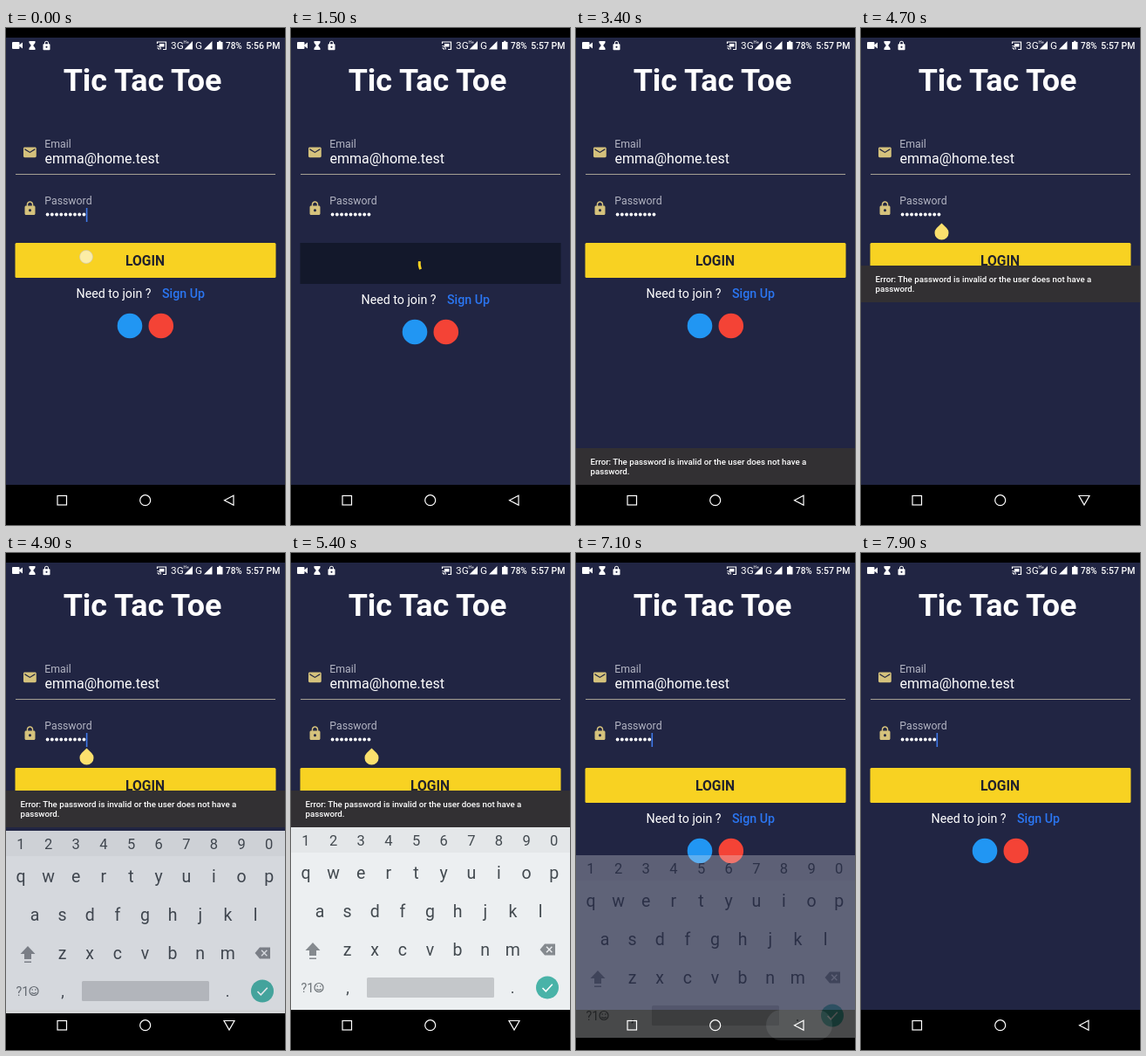
Recreate the animation shown at these times as an HTML page. Size 320 by 569 pixels, loop 8 s.

```html
<!DOCTYPE html>
<html lang="en">
<head>
<meta charset="utf-8">
<title>Login</title>
<style>
  html, body { margin: 0; width: 100%; height: 100%; overflow: hidden; background: #000; }
  svg { display: block; width: 100vw; height: 100vh; font-family: Roboto, "Noto Sans", sans-serif; }
  text { fill: #fff; white-space: pre; }
  .mid { text-anchor: middle; }
  .med { font-weight: 500; }
  .label { font-size: 12.3px; fill: #b3b5c3; }
  .gold { fill: #d5c27c; }
  .line { fill: none; stroke: #fff; stroke-width: 1.2; }
  .status { font-size: 10.5px; }
  .network { font-size: 11.8px; }
  #keyboard text { fill: #434a50; text-anchor: middle; }
</style>
</head>
<body>
<svg viewBox="0 0 320 569" preserveAspectRatio="none">
  <defs>
    <path id="lock" d="M18 8h-1V6c0-2.76-2.24-5-5-5S7 3.24 7 6v2H6c-1.1 0-2 .9-2 2v10c0 1.1.9 2 2 2h12c1.1 0 2-.9 2-2V10c0-1.1-.9-2-2-2zm-6 9c-1.1 0-2-.9-2-2s.9-2 2-2 2 .9 2 2-.9 2-2 2zm3.1-9H8.9V6c0-1.71 1.39-3.1 3.1-3.1s3.1 1.39 3.1 3.1z"/>
    <clipPath id="snackClip"><rect y="481" width="320" height="42"/></clipPath>
  </defs>
  <rect width="320" height="569"/>
  <rect y="11" width="320" height="512" fill="#212543"/>

  <!-- status bar -->
  <g fill="#fff">
    <rect x="7" y="16" width="8.5" height="8" rx="1"/>
    <path d="M15 19.5l4-3v7l-4-3z"/>
    <path d="M26.5 15h7v2l-2.3 3 2.3 3v2h-7v-2l2.3-3-2.3-3z"/>
    <use href="#lock" transform="translate(40.5 14.2) scale(.5)"/>
    <path class="line" d="M173.500 18v-2h10v8.500h-3.500M173.500 20.500a4 4 0 0 1 4 4M173.500 22.800a2 2 0 0 1 2 2"/>
    <rect x="176" y="18" width="5.500" height="3.500"/>
    <path d="M214 15v9.500h-9.500zM236.500 15v9.500h-9.500z"/>
    <path d="M242 16h2v-1.300h2.500v1.300h2v8.500h-6.500z"/>
    <text class="network" x="189" y="24.300">3G</text>
    <text x="203.500" y="17.500" style="font-size:5px">H+</text>
    <text class="network" x="217" y="24.300">G</text>
    <text class="status med" x="252" y="24" style="font-size:10px">78%</text>
    <text class="status med mid" id="clock" x="294.800" y="24"></text>
  </g>

  <!-- form -->
  <text class="mid" x="156.500" y="72" font-size="35.900" font-weight="700">Tic Tac Toe</text>
  <path class="gold" transform="translate(18.500 133.500) scale(.74)" d="M20 4H4c-1.1 0-2 .9-2 2v12c0 1.1.9 2 2 2h16c1.1 0 2-.9 2-2V6c0-1.100-.9-2-2-2zm0 4l-8 5-8-5V6l8 5 8-5z"/>
  <text class="label" x="44.300" y="136.500">Email</text>
  <text x="44.500" y="154.500" font-size="16">emma@home.test</text>
  <rect x="11" y="167" width="298" height="1" fill="#a5a093"/>
  <use class="gold" href="#lock" transform="translate(18.500 197.500) scale(.75)"/>
  <text class="label" x="44.300" y="201.500">Password</text>
  <g id="dots" fill="#fff"></g>
  <rect id="cursor" y="206" width="1.600" height="16" fill="#3f78e8"/>
  <path id="handle" d="M92.500 223.500L98.200 229A8 8 0 1 1 86.800 229z" fill="#fbe06d"/>
  <g id="login">
    <rect x="10.500" y="246" width="299" height="40" rx="1.500" fill="#f8d222"/>
    <text class="mid" x="159.500" y="271.500" font-size="15.700" font-weight="700" style="fill:#22222c">LOGIN</text>
  </g>
  <g id="loading">
    <rect x="10.500" y="246" width="299" height="47" fill="#13182b"/>
    <path id="arc" fill="none" stroke="#f8d222" stroke-width="3" stroke-linecap="square"/>
  </g>
  <g id="links">
    <text x="80.500" y="308.500" font-size="14.220">Need to join ?</text>
    <text class="med" x="179" y="308.500" font-size="14.220" style="fill:#2b76f2">Sign Up</text>
    <circle cx="142" cy="341" r="14.300" fill="#2196f3"/>
    <circle cx="177.800" cy="341" r="14.300" fill="#f44336"/>
  </g>

  <rect id="cover" y="314" width="320" height="209" fill="#212543"/>
  <g id="snack"><g clip-path="url(#snackClip)"><g id="snackBody">
    <rect y="481" width="320" height="42" fill="#323033"/>
    <g id="snackText" class="med" font-size="9.720">
      <text x="16.500" y="499.500">Error: The password is invalid or the user does not have a</text>
      <text x="16.500" y="510.500">password.</text>
    </g>
  </g></g></g>

  <g id="keyboard">
    <rect y="314" width="320" height="209" fill="#eceff1"/>
    <rect y="314" width="320" height="29" fill="#e4e7e9"/>
    <g id="keys"></g>
    <path d="M25 446l8.500 9h-4.500v6h-8v-6h-4.500zM21 463.500h8v1.500h-8z" fill="#858a8f"/>
    <path d="M291 447.500h12v13h-12l-5.500-6.500z" fill="#858a8f"/>
    <path d="M293 450.800l6.400 6.400m0-6.400l-6.400 6.400" stroke="#eceef1" stroke-width="1.400"/>
    <text x="18.800" y="502.500" font-size="14.300" style="fill:#6c7277">?1</text>
    <g fill="none" stroke="#6c7277" stroke-width="1.200">
      <circle cx="32" cy="497.500" r="5"/>
      <path d="M29.300 499a3 2.600 0 0 0 5.400 0M30.200 495.300v1.500M33.800 495.300v1.500"/>
    </g>
    <rect x="87" y="486" width="146" height="23" rx="1.500" fill="#c4c7ca"/>
    <circle cx="294" cy="497.500" r="13" fill="#49b3a8"/>
    <path d="M288.500 498l3.800 3.800 7.500-8" fill="none" stroke="#fff" stroke-width="1.600"/>
  </g>

  <!-- navigation bar -->
  <rect id="navRipple" x="218" y="523" width="76" height="35" rx="17.500" fill="#d8dcec"/>
  <rect class="line" x="59" y="535.500" width="10.500" height="10.500"/>
  <circle class="line" cx="159.700" cy="540.700" r="6"/>
  <path class="line" id="back"/>
  <circle id="touch" r="7.500" fill="#fff" fill-opacity=".6" stroke="#cfc9b8" stroke-opacity=".7"/>
</svg>
<script>
const LOOP = 8000, STEP = 100;
const $ = id => document.getElementById(id);
const NS = 'http://www.w3.org/2000/svg';
const add = (parent, tag, attrs, text = '') => {
  const el = document.createElementNS(NS, tag);
  for (const k in attrs) el.setAttribute(k, attrs[k]);
  el.textContent = text;
  parent.append(el);
  return el;
};
const set = (id, name, value) => $(id).setAttribute(name, value);
const show = (id, on) => set(id, 'visibility', on ? 'visible' : 'hidden');
const clamp = v => Math.min(1, Math.max(0, v));
const within = (t, a, b) => t >= a && t < b;

// cubic-bezier(.4, 0, .2, 1)
function ease(x) {
  x = clamp(x);
  let lo = 0, hi = 1, s = .5;
  for (let i = 0; i < 20; i++) {
    s = (lo + hi) / 2;
    const bx = 1.2 * s * (1 - s) ** 2 + .6 * s * s * (1 - s) + s ** 3;
    if (bx < x) lo = s; else hi = s;
  }
  return s * s * (3 - 2 * s);
}

// keyboard rows: letters, first centre, baseline, size
const rows = [
  ['1234567890', 17, 334.8, 16.5],
  ['qwertyuiop', 17, 372.5, 19.5],
  ['asdfghjkl', 33, 416.5, 19.5],
  ['zxcvbnm', 64.5, 460.5, 19.5]
];
for (const [letters, x, y, size] of rows)
  [...letters].forEach((c, i) => add($('keys'), 'text', { x: x + 31.63 * i, y, 'font-size': size }, c));
add($('keys'), 'text', { x: 65, y: 504, 'font-size': 18 }, ',');
add($('keys'), 'text', { x: 254, y: 504, 'font-size': 18 }, '.');

const dots = Array.from({ length: 9 }, (_, i) =>
  add($('dots'), 'circle', { cx: 47.6 + 5.23 * i, cy: 213.5, r: 1.9 }));

// taps: start, end, x, y
const taps = [
  [0, 100, 92, 262],
  [4400, 4600, 100, 214],
  [5800, 5900, 295, 455],
  [6700, 6800, 256, 541]
];

function drawSpinner(t) {
  const cycles = t / 1333, turn = Math.floor(cycles), u = cycles - turn;
  const head = ease(u * 2), tail = ease(u * 2 - 1);
  const from = Math.PI * (-.5 + 1.5 * tail + 2 * u - .8 * turn);
  const to = from + Math.max(.01, (head - tail) * 1.5 * Math.PI);
  const point = a => `${160 + 12.8 * Math.cos(a)} ${270 + 12.8 * Math.sin(a)}`;
  set('arc', 'd', `M${point(from)}A12.8 12.8 0 ${to - from > Math.PI ? 1 : 0} 1 ${point(to)}`);
}

function draw(t) {
  const loading = within(t, 50, 2500);
  const resized = within(t, 4700, 6900);
  $('clock').textContent = t < 1000 ? '5:56 PM' : '5:57 PM';

  show('login', !loading);
  show('loading', loading);
  set('links', 'transform', `translate(0 ${loading ? 7 : 0})`);
  if (loading) drawSpinner(t - 47);

  const count = t < 5800 ? 9 : 8;
  dots.forEach((d, i) => d.setAttribute('visibility', i < count ? 'visible' : 'hidden'));
  set('cursor', 'x', 44.1 + 5.3 * count);
  show('cursor', (t < 4800 ? t + 100 : t - 4800) % 1000 < 500);
  show('handle', within(t, 4600, 5800));

  const rise = t < 5000 ? ease((t - 2550) / 250) : 1 - ease((t - 6800) / 250);
  show('cover', resized);
  show('snack', rise > 0);
  set('snack', 'transform', `translate(0 ${resized ? -209 : 0})`);
  set('snackBody', 'transform', `translate(0 ${42 * (1 - rise)})`);
  set('snackText', 'opacity', clamp((rise - .45) / .55));

  const open = t < 6000
    ? 1 - (1 - clamp((t - 4700) / 300)) ** 2
    : 1 - clamp((t - 6900) / 240) ** 2;
  show('keyboard', open > 0);
  set('keyboard', 'opacity', open);
  set('keyboard', 'transform', `translate(0 ${Math.round(48.5 * (1 - open) ** 1.12)})`);

  set('back', 'd', resized ? 'M250 535.5h12l-6 10.5z' : 'M250.500 540.700l10.500-5.500v11z');
  set('navRipple', 'opacity', within(t, 6700, 7300) ? .2 * clamp((7300 - t) / 400) : 0);

  const tap = taps.find(([a, b]) => within(t, a, b));
  show('touch', tap);
  if (tap) set('touch', 'transform', `translate(${tap[2]} ${tap[3]})`);
}

const start = performance.now();
function tick() {
  const t = (performance.now() - start) % LOOP;
  draw(Math.floor(t / STEP) * STEP);
  requestAnimationFrame(tick);
}
tick();
</script>
</body>
</html>
```
